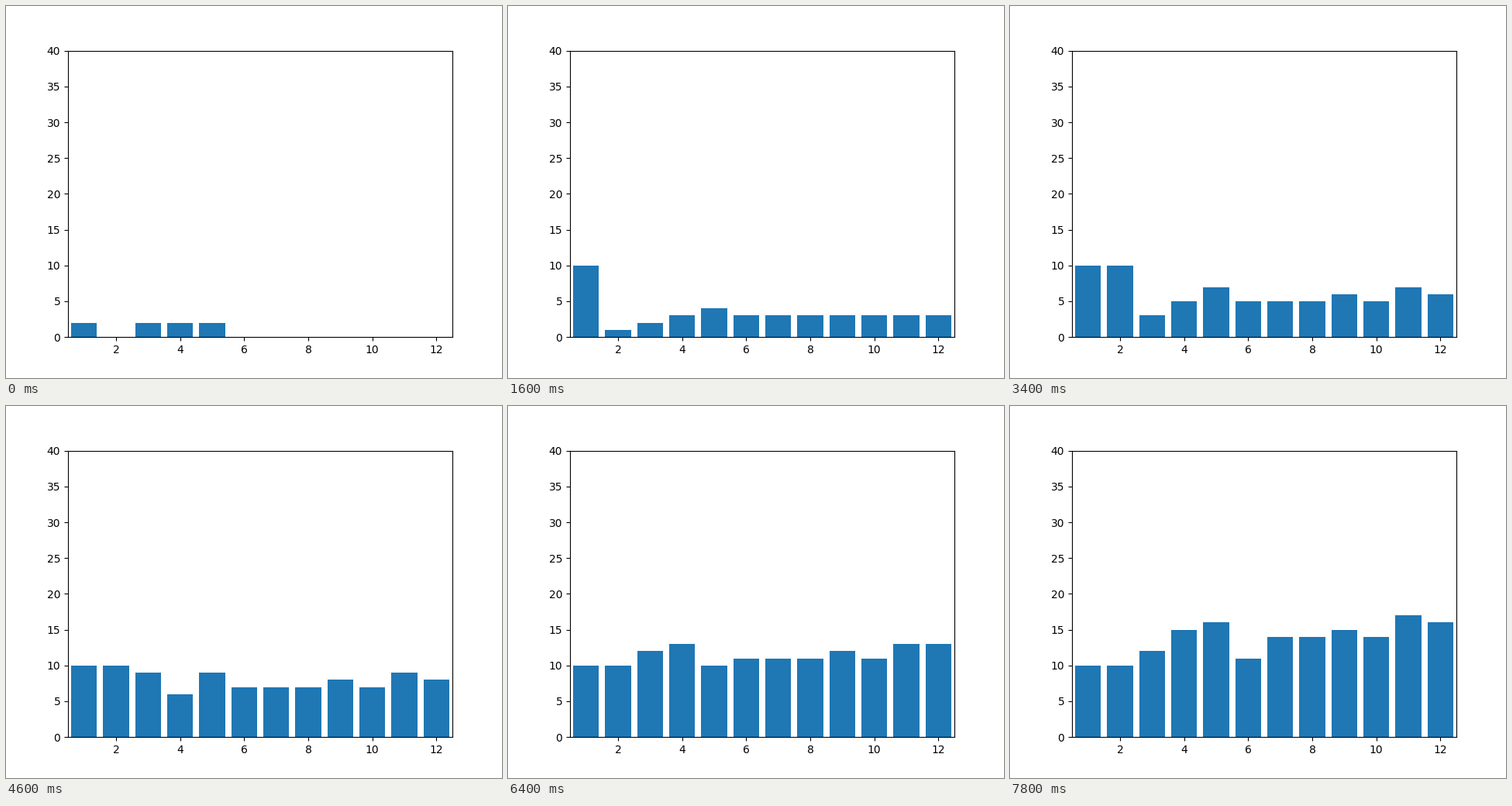
A matplotlib script for the animation above (8000 ms loop, 640 px wide and 480 px high).

```python
import numpy as np
import matplotlib.pyplot as plt
from matplotlib.animation import FuncAnimation

BARS = 12
FRAMES = 40
TURN_LEN = 9

# Every bar drifts up at its own rate until it reaches its rest level.
first = np.array([1, 0, 2, 2, 2] + [0] * 7)
rate = np.array([0, 5, 2, 8, 13, 14, 14, 14, 15, 14, 17, 16])
rest = np.array([1, 1, 3, 6, 10, 11] + [FRAMES] * 6)

# The leading bars then take turns to climb by one per step.
turns = np.array([-1, 8, 17, 25, 33])


def heights(i):
    pace = np.interp(i, [0, 25, FRAMES - 1], [0, 0.57, 1])
    h = np.minimum(first + np.rint(rate * pace), rest)
    h[:len(turns)] += np.clip(i - turns, 0, TURN_LEN)
    return h


fig, ax = plt.subplots(figsize=(6.4, 4.8), dpi=100)
bars = ax.bar(np.arange(1, BARS + 1), heights(0), color="#1f77b4")
ax.set_xlim(0.5, BARS + 0.5)
ax.set_ylim(0, 40)


def update(i):
    for bar, h in zip(bars, heights(i)):
        bar.set_height(h)
    return list(bars)


anim = FuncAnimation(fig, update, frames=FRAMES, interval=200,
                     repeat=True, repeat_delay=0)
plt.show()
```
